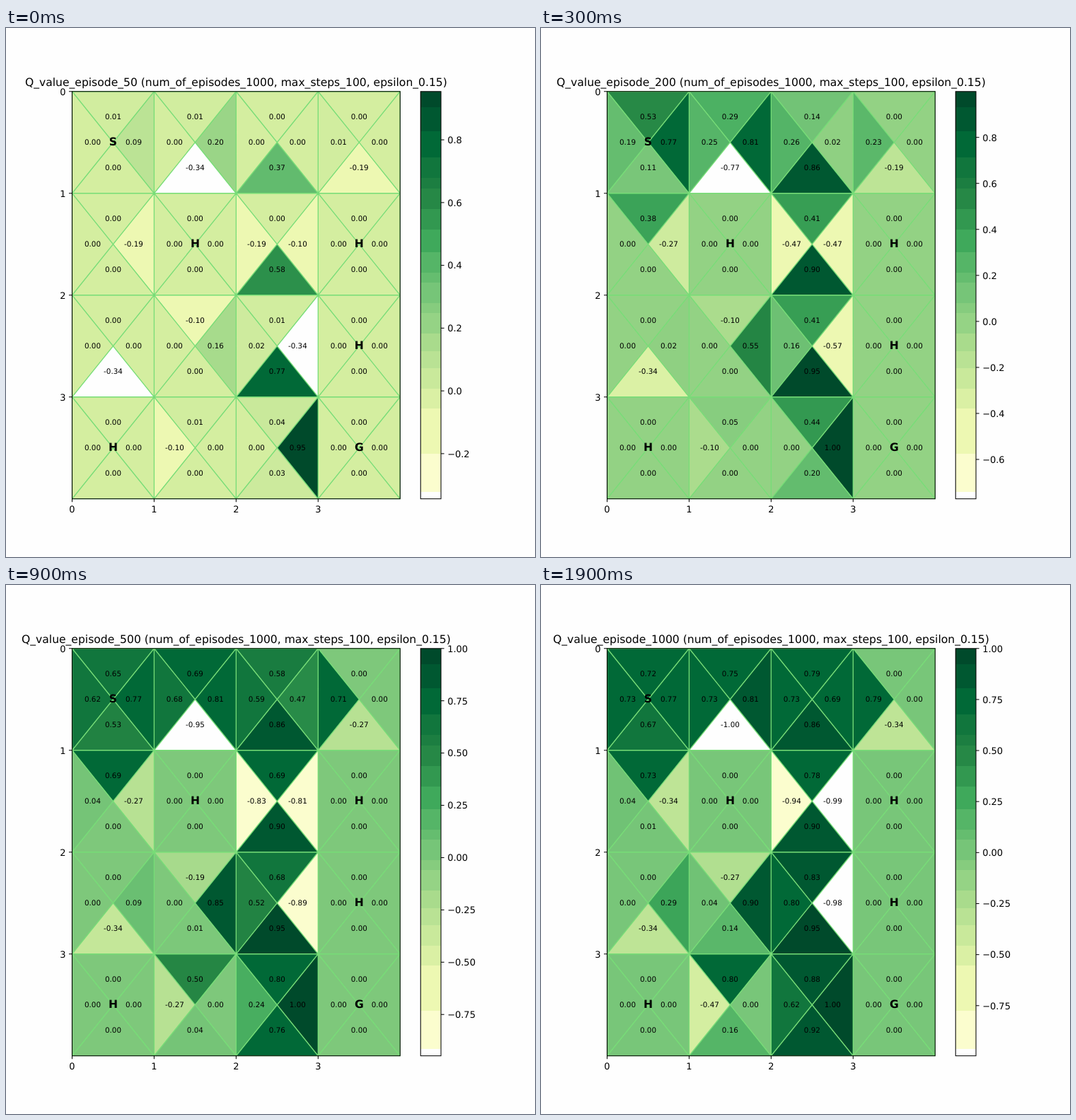
Write an HTML page that moves like this. It is 748x748 px and loops after 2000 ms.

```html
<!DOCTYPE html>
<html lang="en">
<head>
<meta charset="utf-8">
<title>Q values</title>
<style>
html, body { margin: 0; width: 100%; height: 100%; overflow: hidden; background: #fefefe; }
svg { display: block; width: 100vw; height: 100vh; }
text { font-family: "DejaVu Sans", sans-serif; text-rendering: geometricPrecision; }
</style>
</head>
<body>
<svg id="chart" viewBox="0 0 800 800"></svg>
<script>
const svg = document.getElementById('chart');
const X = 100, Y = 96, W = 496, H = 616, CW = W / 4, CH = H / 4;
const BAR = { x: 627, w: 30.8 };
const STEP = 100, COUNT = 20;
const EPISODES = [50, 100, 200, 300, 500, 700, 1000];
const BANDS = [0, .017, .111, .222, .27, .32, .362, .406, .456, .48, .531, .555,
  .605, .661, .711, .762, .788, .838, .9025, .961, 1];
const YLGN = ['ffffe5', 'f7fcb9', 'd9f0a3', 'addd8e', '78c679', '41ab5d', '238443', '006837', '004529']
  .map(h => [0, 2, 4].map(i => parseInt(h.slice(i, i + 2), 16)));

function add(tag, attrs, parent = svg) {
  const el = document.createElementNS('http://www.w3.org/2000/svg', tag);
  for (const k in attrs) el.setAttribute(k, attrs[k]);
  parent.appendChild(el);
  return el;
}

function label(x, y, size, text, anchor = 'middle', parent = svg) {
  const el = add('text', { x, y, 'font-size': size, 'text-anchor': anchor }, parent);
  el.textContent = text;
  return el;
}

function ramp(t) {
  const p = Math.max(0, Math.min(1, t)) * 8, i = Math.min(7, Math.floor(p));
  return `rgb(${YLGN[i].map((c, k) => Math.round(c + (YLGN[i + 1][k] - c) * (p - i)))})`;
}

function bandColor(i) {
  return i === 0 ? '#fefefe' : ramp((BANDS[i] + BANDS[i + 1]) / 2);
}

function shade(t) {
  if (t > .222 && t < .788) return ramp(t);
  let i = BANDS.length - 2;
  while (i > 0 && t < BANDS[i]) i--;
  return bandColor(i);
}

// Learned values in percent, and counts of falls into a hole (rate 0.1).
const tracks = {};
const gain = (id, ...keys) => { tracks[id] = { keys, value: v => v / 100 }; };
const fall = (id, ...keys) => { tracks[id] = { keys, value: n => .9 ** Math.round(n) - 1 }; };

gain('00T', 1, 3, 53, 60, 65, 69, 72);
gain('00L', 0, 6, 19, 37, 62, 71, 73);
gain('00R', 9, 63, 77);
gain('00B', 0, 0, 11, 27, 53, 60, 67);
gain('01T', 1, 19, 29, 52, 69, 72, 75);
gain('01L', 0, 0, 25, 42, 68, 70, 73);
gain('01R', 20, 73, 81);
fall('01B', 4, 7, 14, 18, 28, 43, 52);
gain('02T', 0, 7, 14, 37, 58, 74, 79);
gain('02L', 0, 7, 26, 43, 59, 70, 73);
gain('02R', 0, 0, 2, 18, 47, 51, 69);
gain('02B', 37, 82, 86);
gain('03L', 1, 1, 23, 50, 71, 73, 79);
fall('03B', 2, 2, 2, 2, 3, 3, 4);
gain('10T', 0, 0, 38, 54, 69, 71, 73);
gain('10L', 0, 0, 0, 4);
fall('10R', 2, 2, 3, 3, 3, 3, 4);
gain('10B', 0, 0, 0, 0, 0, 1);
gain('12T', 0, 20, 41, 58, 69, 70, 78);
fall('12L', 2, 3, 6, 7, 17, 21, 27);
fall('12R', 1, 3, 6, 9, 16, 23, 43);
gain('12B', 58, 89, 90);
gain('20R', 0, 0, 2, 2, 9, 29);
fall('20B', 4);
fall('21T', 1, 1, 1, 1, 2, 3);
gain('21L', 0, 0, 0, 0, 0, 4);
gain('21R', 16, 16, 55, 71, 85, 89, 90);
gain('21B', 0, 0, 0, 1, 1, 1, 14);
gain('22T', 1, 1, 41, 49, 68, 78, 83);
gain('22L', 2, 2, 16, 25, 52, 73, 80);
fall('22R', 4, 5, 8, 11, 21, 28, 37);
gain('22B', 77, 95);
gain('31T', 1, 1, 5, 27, 50, 64, 80);
fall('31L', 1, 1, 1, 1, 3, 5, 6);
gain('31B', 0, 0, 0, 1, 4, 4, 16);
gain('32T', 4, 13, 44, 60, 80, 85, 88);
gain('32L', 0, 0, 0, 5, 24, 40, 62);
gain('32R', 95.4, 99.8, 99.95, 100);
gain('32B', 3, 3, 20, 55, 76, 89, 92);

function valueAt(id, episode) {
  const track = tracks[id];
  if (!track) return 0;
  const key = i => track.keys[Math.min(i, track.keys.length - 1)];
  let i = 0;
  while (i < EPISODES.length - 2 && episode >= EPISODES[i + 1]) i++;
  const u = (episode - EPISODES[i]) / (EPISODES[i + 1] - EPISODES[i]);
  return track.value(key(i) + (key(i + 1) - key(i)) * u);
}

// Each side: two corners of its triangle and the label position, in cell units.
const SIDES = {
  T: [[0, 0], [1, 0], [.5, .25]],
  L: [[0, 0], [0, 1], [.25, .5]],
  R: [[1, 0], [1, 1], [.75, .5]],
  B: [[0, 1], [1, 1], [.5, .75]]
};
const MARKS = { '00': 'S', '11': 'H', '13': 'H', '23': 'H', '30': 'H', '33': 'G' };

const fills = add('g', {}), edges = add('g', {}), frame = add('g', {}), texts = add('g', {});
const parts = [];
let grid = '';

for (let r = 0; r < 4; r++) {
  for (let c = 0; c < 4; c++) {
    const at = ([u, v]) => [X + (c + u) * CW, Y + (r + v) * CH];
    for (const side in SIDES) {
      const [a, b, pos] = SIDES[side];
      const points = [a, b, [.5, .5]].map(p => at(p).join()).join(' ');
      const [x, y] = at(pos);
      parts.push({
        id: `${r}${c}${side}`,
        shape: add('polygon', { points }, fills),
        text: label(x, y + 3.2, 11.11, '', 'middle', texts)
      });
    }
    const [x, y] = at([0, 0]);
    grid += `M${x} ${y}h${CW}v${CH}h${-CW}zl${CW} ${CH}M${x + CW} ${y}l${-CW} ${CH}`;
    const mark = MARKS[`${r}${c}`];
    if (mark) {
      const [mx, my] = at([.5, .5]);
      label(mx, my + 5, 16.67, mark, 'middle', texts).setAttribute('font-weight', 'bold');
    }
  }
}
add('path', { d: grid, fill: 'none', stroke: '#77dd77', 'stroke-width': 1.39 }, edges);

const LINE = { fill: 'none', stroke: '#000', 'stroke-width': 1.11 };
for (let i = 0; i < 4; i++) {
  const x = X + i * CW, y = Y + i * CH;
  add('path', { d: `M${x} ${Y + H}v4.86M${X} ${y}h-4.86`, ...LINE }, frame);
  label(x, Y + H + 20.3, 13.89, i);
  label(X - 9.72, y + 5.2, 13.89, i, 'end');
}
add('rect', { x: X, y: Y, width: W, height: H, ...LINE }, frame);

for (let i = 0; i < BANDS.length - 1; i++) {
  add('rect', {
    x: BAR.x, width: BAR.w, y: Y + H * (1 - BANDS[i + 1]), height: H * (BANDS[i + 1] - BANDS[i]),
    fill: bandColor(i), 'shape-rendering': 'crispEdges'
  });
}
add('rect', { x: BAR.x, y: Y, width: BAR.w, height: H, ...LINE });

const ticks = add('g', {});
const title = label(X + W / 2, 87.7, 16.67, '');

function drawTicks(min, max) {
  ticks.replaceChildren();
  const fine = max - min > 1.8, step = fine ? .25 : .2;
  for (let k = Math.ceil(min / step); k * step <= max + 1e-9; k++) {
    const y = Y + H * (max - k * step) / (max - min), x = BAR.x + BAR.w;
    add('path', { d: `M${x} ${y}h4.86`, ...LINE }, ticks);
    const number = (k < 0 ? '\u2212' : '') + Math.abs(k * step).toFixed(fine ? 2 : 1);
    label(x + 9.72, y + 5.2, 13.89, number, 'start', ticks);
  }
}

function draw(episode) {
  const values = parts.map(p => valueAt(p.id, episode));
  const min = Math.min(...values), max = Math.max(...values);
  parts.forEach((p, i) => {
    p.shape.setAttribute('fill', shade((values[i] - min) / (max - min)));
    p.text.textContent = values[i].toFixed(2);
  });
  drawTicks(min, max);
  title.textContent = `Q_value_episode_${episode} (num_of_episodes_1000, max_steps_100, epsilon_0.15)`;
}

const start = performance.now();
let shown = -1;
function tick() {
  const index = Math.floor((performance.now() - start) / STEP) % COUNT;
  if (index !== shown) draw((index + 1) * 50);
  shown = index;
  requestAnimationFrame(tick);
}
tick();
</script>
</body>
</html>
```
